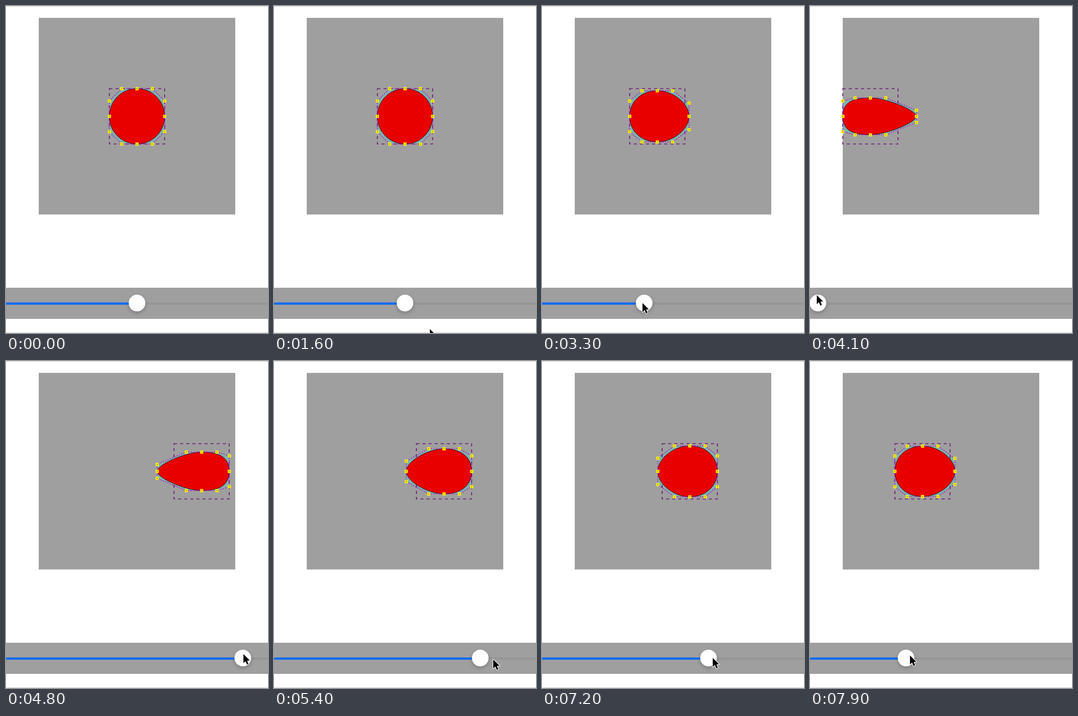
These frames come from a looping animation (464x578 px, 8000 ms). An HTML page with a canvas:

```html
<!DOCTYPE html>
<html lang="en">
<head>
<meta charset="utf-8">
<title>Elastic circle slider</title>
<style>
html, body { margin: 0; width: 100%; height: 100%; overflow: hidden; background: #fff; }
canvas { display: block; width: 464px; height: 578px; }
</style>
</head>
<body>
<canvas id="stage" width="464" height="578"></canvas>
<script>
const ctx = document.getElementById('stage').getContext('2d');
const LOOP = 8000, STEP = 100, LAG = 24;
const VIEW = { x: 58, y: 21, size: 348 };
const BOX = 97.8, MID_Y = 195;

// [time, slider value]
const drag = [
  [0, .5], [2450, .5], [2850, .07], [3260, .39], [3760, 0], [4200, 0],
  [4700, 1], [5100, .55], [5650, 1], [6050, 1], [6440, .758], [6900, .385],
  [7350, .735], [7760, .7], [7890, .358], [8000, .358]
];
// [time, pointer x relative to the thumb, pointer y]
const pointer = [
  [1600, 44, 571], [2300, -3, 525], [3300, -3, 525], [4100, -2, 511],
  [5100, 2, 520], [5400, 23, 527.5], [6500, 8, 529], [7900, 7, 520.5]
];

function sample(keys, t, col = 1) {
  if (t <= keys[0][0]) return keys[0][col];
  const i = keys.findIndex(k => k[0] >= t);
  if (i < 0) return keys[keys.length - 1][col];
  const a = keys[i - 1], b = keys[i];
  const u = (t - a[0]) / (b[0] - a[0]);
  return a[col] + (b[col] - a[col]) * u * u * (3 - 2 * u);
}

function rect(x, y, w, h, color) {
  ctx.fillStyle = color;
  ctx.fillRect(x, y, w, h);
}

function polygon(points) {
  ctx.beginPath();
  points.forEach(p => ctx.lineTo(p[0], p[1]));
  ctx.closePath();
}

function dashed(color, width, dash) {
  ctx.strokeStyle = color;
  ctx.lineWidth = width;
  ctx.setLineDash(dash);
  ctx.stroke();
  ctx.setLineDash([]);
}

function drawBlob(p) {
  const left = VIEW.x + p * (VIEW.size - BOX), cx = left + BOX / 2;
  const top = MID_Y - BOX / 2;
  const pull = BOX / 6 * Math.abs(p - .5) * 2;
  const arm = BOX / 3.6, h = BOX / 2 - pull;
  const toRight = p <= .5;
  const right = left + BOX + (toRight ? pull * 2 : 0);
  const tail = left - (toRight ? 0 : pull * 2);
  const armR = arm - (toRight ? pull : 0), armL = arm - (toRight ? 0 : pull);
  const y0 = MID_Y - h, y1 = MID_Y + h;
  // anchors at every third point, control points between
  const pts = [
    [cx, y0], [cx + arm, y0], [right, MID_Y - armR],
    [right, MID_Y], [right, MID_Y + armR], [cx + arm, y1],
    [cx, y1], [cx - arm, y1], [tail, MID_Y + armL],
    [tail, MID_Y], [tail, MID_Y - armL], [cx - arm, y0]
  ];

  polygon(pts);
  ctx.fillStyle = '#7fb0b0';
  ctx.fill();

  ctx.beginPath();
  ctx.rect(left, top, BOX, BOX);
  dashed('#650a70', 1.4, [5.4, 5.4]);

  ctx.beginPath();
  ctx.moveTo(...pts[0]);
  for (let i = 0; i < 12; i += 3)
    ctx.bezierCurveTo(...pts[i + 1], ...pts[i + 2], ...pts[(i + 3) % 12]);
  ctx.fillStyle = '#e80000';
  ctx.fill();
  ctx.strokeStyle = '#301010';
  ctx.lineWidth = 1;
  ctx.stroke();

  polygon(pts);
  dashed('#b312c4', 1.4, [2.2, 2.2]);

  for (const [x, y] of pts) {
    rect(x - 2.7, y - 2.7, 5.6, 5.6, '#fff200');
    rect(x - .8, y - .8, 1.8, 1.8, '#8f8420');
  }
}

function drawSlider(x) {
  rect(0, 498, 464, 55, '#9f9f9f');
  rect(x, 524, 464 - x, 4, '#95959a');
  rect(0, 524, x, 4, '#0a6cf5');
  ctx.save();
  ctx.shadowColor = 'rgba(0,0,0,.22)';
  ctx.shadowBlur = 7;
  ctx.shadowOffsetY = 3;
  ctx.beginPath();
  ctx.arc(x, 525, 14.7, 0, Math.PI * 2);
  ctx.fillStyle = '#fff';
  ctx.fill();
  ctx.restore();
}

const ARROW = [[0, 0], [0, 16], [3.7, 12.6], [6.4, 18.4], [9, 17.2], [6.5, 11.6], [11.2, 11.3]];
const RESIZE = [[-8, 0], [-3, -5], [-3, -1.4], [3, -1.4], [3, -5],
                [8, 0], [3, 5], [3, 1.4], [-3, 1.4], [-3, 5]];

function drawPointer(x, y, shape) {
  ctx.save();
  ctx.translate(x, y);
  polygon(shape);
  ctx.lineJoin = 'round';
  ctx.strokeStyle = '#fff';
  ctx.lineWidth = 2;
  ctx.stroke();
  ctx.fillStyle = '#000';
  ctx.fill();
  ctx.restore();
}

function draw(t) {
  rect(0, 0, 464, 578, '#fff');
  rect(0, 0, 464, 1, '#d4d4d4');
  rect(0, 577, 464, 1, '#d4d4d4');
  rect(VIEW.x, VIEW.y, VIEW.size, VIEW.size - .5, '#9f9f9f');
  drawBlob(sample(drag, t - LAG));
  const thumb = 14 + 436 * sample(drag, t);
  drawSlider(thumb);
  if (t >= pointer[0][0])
    drawPointer(thumb + sample(pointer, t), sample(pointer, t, 2),
      t >= 6450 && t < 6600 ? RESIZE : ARROW);
}

const start = performance.now();
function tick() {
  const t = (performance.now() - start) % LOOP;
  draw(Math.floor(t / STEP) * STEP);
  requestAnimationFrame(tick);
}
tick();
</script>
</body>
</html>
```
